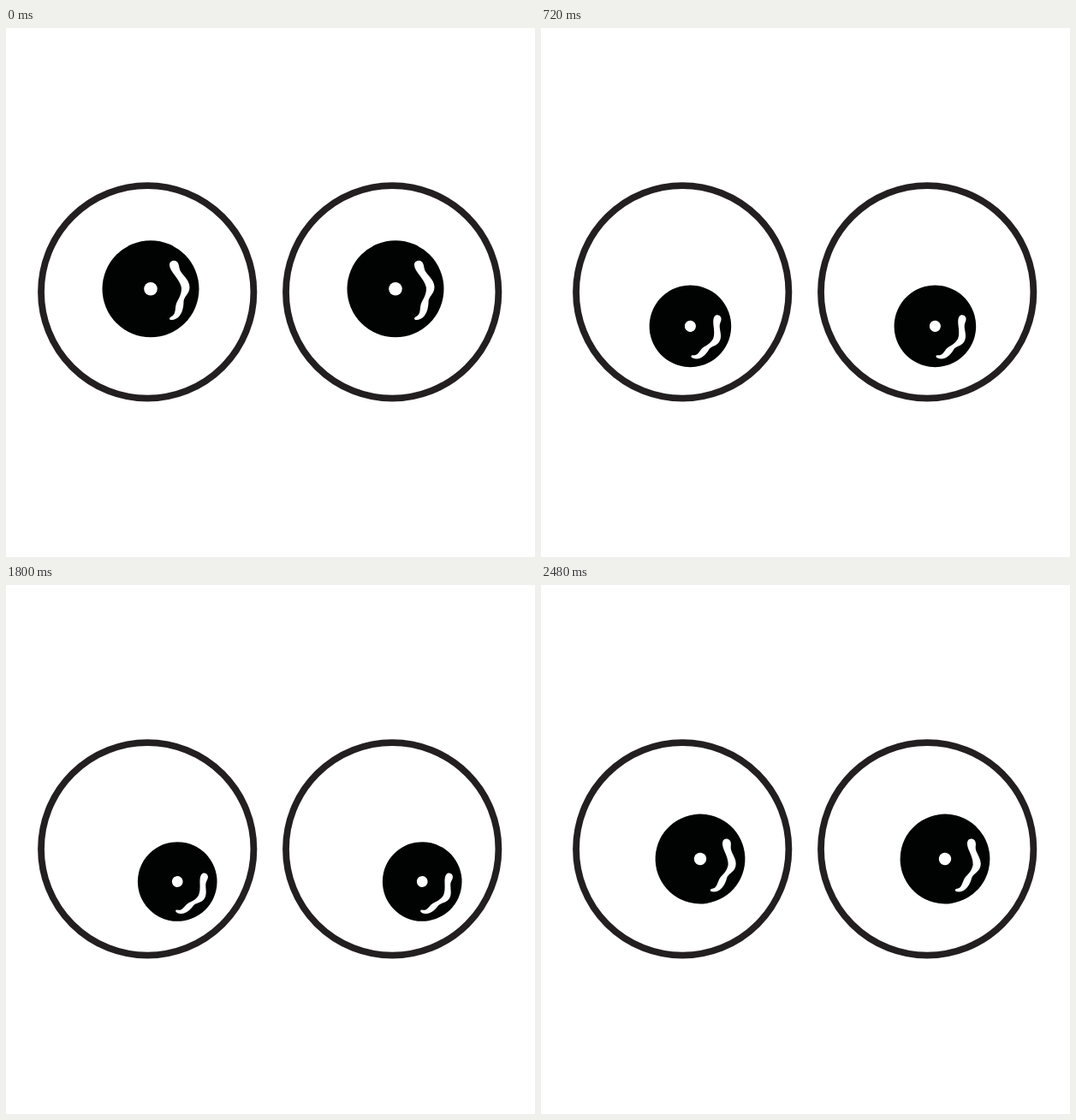
Animation, 618 px wide and 618 px high, one loop 2.52 s. Source, as an HTML page:

```html
<!DOCTYPE html>
<html lang="en">
<head>
<meta charset="utf-8">
<title>Rolling eyes</title>
<style>
  html, body { margin: 0; width: 100%; height: 100%; overflow: hidden; background: #fff; }
  svg { display: block; width: 100%; height: 100%; }
</style>
</head>
<body>
<svg viewBox="0 0 618 618">
  <defs>
    <g id="eye">
      <circle cx="165.2" cy="308.4" r="124.2" fill="#fff" stroke="#231f20" stroke-width="7.8"/>
      <g id="pupil">
        <circle r="56.5" fill="#010202"/>
        <circle r="7.8" fill="#fff"/>
        <path fill="#fff" d="M27.5-33C32-32.5 33-28.5 33.5-24.5C34.5-17 45.5-12 45.5-2C45.5 6 38.5 9 38.5 15
          C38.5 22 36.5 35 25 36.3C21.5 36.5 21 34 24 32.5C30 30 28 23 30 17C32 12 36 8 36-1
          C35-7 31-12 28-16C25-20 22-24 22-28C22-31.5 24.5-33 27.5-33Z"/>
      </g>
    </g>
  </defs>
  <use href="#eye"/>
  <use href="#eye" x="286"/>
</svg>
<script>
  const LOOP = 2520, STEP = 40, SHRINK = 0.18, TURN = 35.5;
  const rest = { x: 169, y: 304.8 };
  const low = { x: 175.3, y: 355.7 };
  const side = { x: 211.1, y: 342.5 };
  const pupil = document.getElementById('pupil');

  const ramp = (time, from, to) => Math.min(1, Math.max(0, (time - from) / (to - from)));
  const mix = (a, b, part) => ({ x: a.x + (b.x - a.x) * part, y: a.y + (b.y - a.y) * part });

  function pose(time) {
    const fall = ramp(time, 10, 840);
    const drift = ramp(time, 975, 2160);
    const rise = ramp(time, 2155, 2700); // the loop restarts before this ends
    const { x, y } = mix(mix(mix(rest, low, fall), side, drift), rest, rise);
    const lowered = fall - rise;
    return `translate(${x} ${y}) rotate(${TURN * lowered}) scale(${1 - SHRINK * lowered})`;
  }

  const start = performance.now();

  function draw() {
    const elapsed = (performance.now() - start) % LOOP;
    pupil.setAttribute('transform', pose(Math.floor(elapsed / STEP) * STEP));
    requestAnimationFrame(draw);
  }

  draw();
</script>
</body>
</html>
```
